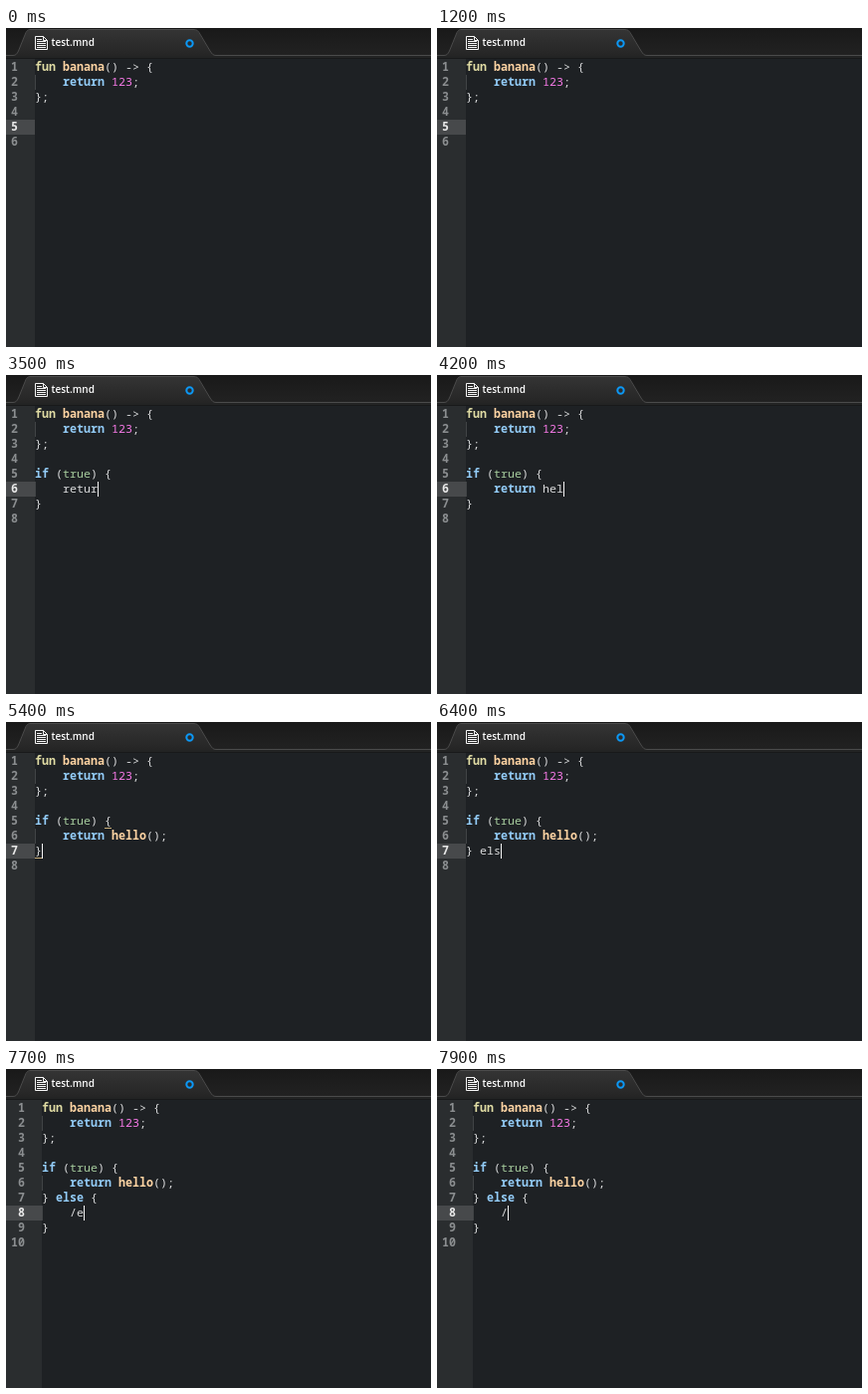
Write an HTML page that moves like this. It is 427 px wide and 320 px high and loops after 8 s.

```html
<!DOCTYPE html>
<html lang="en">
<head>
<meta charset="utf-8">
<title>Code editor</title>
<style>
  html, body { margin: 0; width: 100%; height: 100%; overflow: hidden; background: #1e2124; }
  svg { display: block; width: 100%; height: 100%; }
  text { white-space: pre; }
  .code { font: 500 11.667px "Noto Sans Mono", "DejaVu Sans Mono", monospace; fill: #dcddde; }
  .tab { font: 600 10px "Open Sans", "Noto Sans", sans-serif; fill: #fff; }
  .storage { fill: #e0dca4; font-weight: 600; }
  .keyword { fill: #93ccf8; font-weight: 600; }
  .constant { fill: #a8ce9f; }
  .number { fill: #f87ae8; }
  .function { fill: #ffd4a3; font-weight: 600; }
  .line { fill: #8b8e90; font-weight: 600; }
  .line.active { fill: #e8e8e8; }
</style>
</head>
<body>
<svg viewBox="0 0 427 320">
  <defs>
    <linearGradient id="bar" x2="0" y2="1">
      <stop stop-color="#191919"/><stop offset="1" stop-color="#222"/>
    </linearGradient>
    <linearGradient id="tab" x2="0" y2="1">
      <stop stop-color="#343434"/><stop offset="1" stop-color="#252525"/>
    </linearGradient>
  </defs>
  <rect width="427" height="320" fill="#1e2124"/>
  <g id="editor"></g>
  <rect width="427" height="28" fill="url(#bar)"/>
  <rect y="27" width="427" height="4" fill="#232424"/>
  <rect y="30" width="427" height="1" fill="#18191a"/>
  <path d="M7 28C10 28 11 26.500 12.500 23.500L20 5Q21.500 2 24 2H189Q192.500 2 194 5L205 23.500C207 26.500 208 28 211 28Z" fill="url(#tab)"/>
  <path d="M0 27.500H7C10 27.500 11 26 12.500 23L20 4.500Q21.500 1.500 24 1.500H189Q192.500 1.500 194 4.500L205 23C207 26 208 27.500 211 27.500H427" fill="none" stroke="#4b4b4b"/>
  <path d="M29.500 8.500H37.500L41.500 12.500V21.500H29.500ZM37.500 8.500V12.500H41.500M31 11.500H36M31 13.500H40M31 15.500H40M31 17.500H40M31 19.500H40" fill="#2a2a2a" stroke="#f4f4f4"/>
  <text class="tab" x="45.500" y="18">test.mnd</text>
  <circle cx="184.500" cy="15.500" r="3.200" fill="none" stroke="#0c98f5" stroke-width="2"/>
</svg>
<script>
const LOOP = 8000, CHAR = 7, ROW = 15, TOP = 32;
const editor = document.getElementById("editor");

const head = "fun banana() -> {\n    return 123;\n};\n\n";
const block = (body, rest = "") => `if (true) {\n    ${body}\n}${rest}\n`;
const branch = body => block("return hello();", ` else {\n    ${body}\n}`);

// Each step keeps the fields of the one before, except for selection, marks and popup.
const steps = [];
const step = (at, change) =>
  steps.push({ ...steps.at(-1), select: null, marks: [], popup: false, alpha: 1, at, ...change });

// Types text one state per 100 ms, with the caret following.
function type(at, states, col, wrap) {
  states.forEach((text, i) =>
    step(at + i * 100, { code: wrap(text), col: col + text.length }));
}

const braces = [[5, 10], [7, 0]];
step(0, { code: "\n", row: 5, col: 0, alpha: 0 });
step(700, { alpha: 0.5 });
step(800, {});
step(1200, { alpha: 0 });
type(1600, ["i", "if"], 0, s => s + "\n");
step(2200, { alpha: 0 });
step(2300, { code: block(""), alpha: 0, select: [5, 4, 8] });
step(2800, { row: 6, col: 4 });
type(3200, ["r", "re", "ret", "retur", "return"], 4, s => block(s));
type(3800, ["return "], 4, s => block(s));
type(4000, ["h", "he", "hel", "hell", "hello"], 11, s => block("return " + s));
step(4700, { code: block("return hello()"), col: 18, marks: [[6, 16], [6, 17]] });
step(5100, { code: block("return hello();"), col: 19 });
step(5400, { row: 7, col: 1, marks: braces });
step(5900, { alpha: 0, marks: braces });
type(6000, [" "], 1, s => block("return hello();", s));
type(6200, ["e", "el", "els", "else"], 2, s => block("return hello();", " " + s));
step(6700, { code: branch(""), row: 8, col: 4 });
step(7100, { alpha: 0 });
type(7400, ["/"], 4, branch);
type(7700, ["/e"], 4, branch);
step(7800, { popup: true });
type(7900, ["/"], 4, branch);

const rowTop = row => TOP + (row - 1) * ROW;
const rect = (x, y, w, h, fill, extra = "") =>
  `<rect x="${x}" y="${y}" width="${w}" height="${h}" fill="${fill}" ${extra}/>`;
const label = (x, row, content, kind = "") =>
  `<text class="code ${kind}" x="${x}" y="${rowTop(row) + 11}">${content}</text>`;

function highlight(source) {
  return source.replace(/[a-z]+(\(?)|\d+|>/g, (token, paren) => {
    if (token === ">") return "&gt;";
    const word = paren ? token.slice(0, -1) : token;
    const kind = /^\d/.test(word) ? "number"
      : word === "fun" ? "storage"
      : word === "true" ? "constant"
      : /^(return|if|else)$/.test(word) ? "keyword"
      : paren ? "function" : "";
    return `<tspan class="${kind}">${word}</tspan>${paren || ""}`;
  });
}

function popup(x, y) {
  const words = ["else", "hello", "return", "true"];
  return rect(x, y, 200, 62, "#2d2f32") + rect(x, y + 1, 200, ROW, "#454749") +
    words.map((word, i) =>
      `<text class="code" x="${x + CHAR}" y="${y + 12 + i * ROW}">${word}</text>`).join("");
}

function render({ code, row, col, alpha, select, marks, popup: open }) {
  const lines = (head + code).split("\n");
  const digits = String(lines.length).length;
  const left = 22 + digits * CHAR;
  const x = column => left + column * CHAR;
  let out = rect(0, 31, left, 289, "#2a2d2f") + rect(0, rowTop(row), left, ROW, "#47494b");

  if (select) {
    const [r, from, to] = select;
    out += rect(x(from), rowTop(r), (to - from) * CHAR, ROW, "#4a4c4e", 'rx="2"');
  }
  lines.forEach((line, i) => {
    const number = i + 1, indent = line.search(/\S|$/);
    if (indent) out += rect(left, rowTop(number), 1, ROW, "#414446");
    out += label(5 + (digits - String(number).length) * CHAR, number, number,
      number === row ? "line active" : "line");
    out += label(x(indent), number, highlight(line.slice(indent)));
  });
  for (const [r, c] of marks) out += rect(x(c), rowTop(r) + 14, CHAR, 1, "#c8ad78");
  out += rect(x(col), rowTop(row), 1, ROW, "#f4f4f4", `opacity="${alpha}"`);
  if (open) out += popup(x(4), rowTop(row + 1));
  editor.innerHTML = out;
}

let shown;
function tick() {
  const time = performance.now() % LOOP;
  const current = steps.findLast(s => s.at <= time);
  if (current !== shown) render(shown = current);
  requestAnimationFrame(tick);
}
tick();
</script>
</body>
</html>
```
